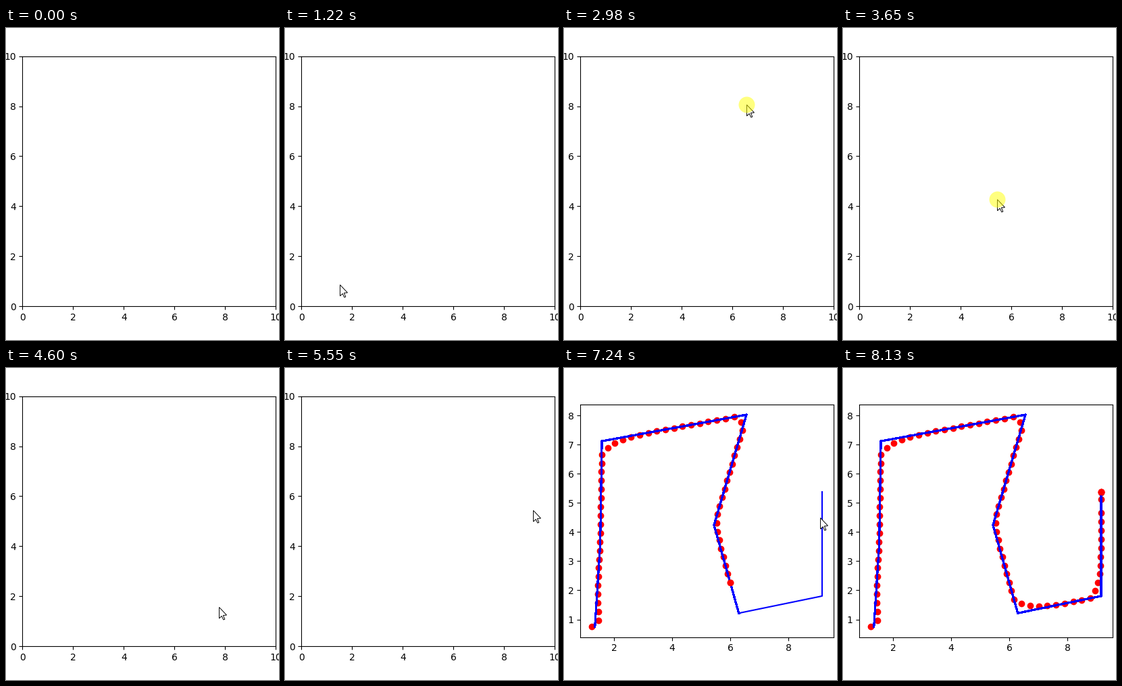
Write a matplotlib script that moves like this. It is 404 by 461 pixels and loops after 8.94 s.

```python
import math

import matplotlib.pyplot as plt
import numpy as np
from matplotlib.animation import FuncAnimation
from matplotlib.patches import Circle, Polygon

W, H, DPI = 404, 461, 100
LOOP, STEP = 8940, 20
REFRESH = 69            # ms between screen updates
ENTER_AT, PLOT_AT, EXIT_AT = 180, 6200, 7100
HOLD, REST = 130, 70    # click length, pause before a click
DOT_MS = 20.3

# Way points clicked in the empty axes (data units)
PATH = np.array([(1.346, 0.75), (1.527, 3.553), (1.586, 7.12), (6.555, 8.027),
                 (5.44, 4.24), (6.292, 1.216), (9.155, 1.803), (9.155, 5.38)])
CLICKS = [1350, 1820, 2360, 2960, 3650, 4210, 4810, 5410]

ARROW = np.array([(0, 0), (0, 16.5), (3.7, 13), (6.3, 18.5),
                  (8.3, 17.7), (5.9, 12), (11, 11.6)])

# The pointer enters, visits every way point and leaves on the right
STOPS = np.array([(288, 310),
                  *(PATH * (37.5, -36.96) + (24.6, 409.8)),
                  (412, 250)])
LEAVE = [ENTER_AT] + [c + HOLD for c in CLICKS[:-1]] + [EXIT_AT]
ARRIVE = [c - REST for c in CLICKS] + [EXIT_AT + 400]


def snap(t):
    return PLOT_AT + REFRESH * math.floor((t - PLOT_AT) / REFRESH)


def pointer_at(t):
    leg = max(sum(start <= t for start in LEAVE) - 1, 0)
    u = (t - LEAVE[leg]) / (ARRIVE[leg] - LEAVE[leg])
    u = min(max(u, 0), 1)
    u = u * u * (3 - 2 * u)
    return np.floor(STOPS[leg] + (STOPS[leg + 1] - STOPS[leg]) * u)


def follow(path, start=(1.246, 0.757), pace=0.3, ahead=0.6, reach=0.6):
    """Line-of-sight path follower with a limited turn rate."""
    pos, heading, seg = np.array(start), 0.0, 0
    dots, segs = [pos], [0]
    last = len(path) - 2
    while True:
        if seg < last and np.hypot(*(path[seg + 1] - pos)) < reach:
            seg += 1
        goal = path[seg + 1]
        if seg == last and np.hypot(*(goal - pos)) < 0.75:
            break
        line = goal - path[seg]
        line = line / np.hypot(*line)
        along = np.dot(pos - path[seg], line)
        aim = path[seg] + line * (along + ahead) - pos
        turn = math.atan2(aim[1], aim[0]) - heading
        turn = (turn + math.pi) % (2 * math.pi) - math.pi
        heading += min(max(turn, -math.pi / 4), math.pi / 4)
        pos = pos + pace * np.array([math.cos(heading), math.sin(heading)])
        dots.append(pos)
        segs.append(seg)
    # Settle on the goal
    for _ in range(4):
        gap = goal - pos
        pos = goal - gap * np.hypot(*gap) / 2
        dots.append(pos)
        segs.append(last)
    return np.array(dots), segs


DOTS, SEGS = follow(PATH)

fig = plt.figure(figsize=(W / DPI, H / DPI), dpi=DPI, facecolor="white")


def pixel_axes(left, top, width, height):
    return fig.add_axes([left / W, 1 - (top + height) / H, width / W, height / H])


# Empty axes for clicking
blank = pixel_axes(24.4, 41.6, 375, 369.6)
blank.set(xlim=(0, 10), ylim=(0, 10))

# Axes with the path, equal scale on both sides
scale = 43.05
chart_w, chart_h = 375, 344.2
x0, y0 = 0.85, 0.391
chart = pixel_axes(24.4, 53.55, chart_w, chart_h)
chart.set(xlim=(x0, x0 + chart_w / scale), ylim=(y0, y0 + chart_h / scale),
          xticks=range(2, 9, 2), yticks=range(1, 9))
trail, = chart.plot([], [], "ro", ms=6, zorder=1)
chart.plot(*PATH.T, "b", lw=1.5)
walked, = chart.plot([], [], "b", lw=1.6, antialiased=False)
head, = chart.plot([], [], "ro", ms=6, zorder=3)

# Pointer layer in pixels
screen = fig.add_axes([0, 0, 1, 1])
screen.set(xlim=(0, W), ylim=(H, 0))
screen.axis("off")
arrow = Polygon(ARROW, facecolor="white", edgecolor="black", lw=0.68,
                joinstyle="miter", zorder=3)
halo = Circle((0, 0), 12, facecolor="yellow", alpha=0.5, lw=0, zorder=4)
screen.add_patch(arrow)
screen.add_patch(halo)


def draw(i):
    t = i * STEP + STEP / 2
    s = snap(t)
    plotted = t >= PLOT_AT
    blank.set_visible(not plotted)
    chart.set_visible(plotted)

    tip = pointer_at(s) + 0.5
    arrow.set_visible(t >= ENTER_AT and tip[0] < W)
    arrow.set_xy(ARROW + tip)
    halo.center = tip
    halo.set_visible(any(c <= t < c + HOLD for c in CLICKS))

    n = 0
    if plotted:
        n = min(int(7 + (s - PLOT_AT) / DOT_MS), len(DOTS))
    trail.set_data(*DOTS[:n].T)
    head.set_data(*DOTS[max(n - 1, 0):n].T)
    walked.set_data(*PATH[:SEGS[n - 1] + 2 if n else 0].T)
    return arrow, halo, trail, head, walked


anim = FuncAnimation(fig, draw, frames=LOOP // STEP, interval=STEP,
                     repeat=True, repeat_delay=0, blit=False)
plt.show()
```
